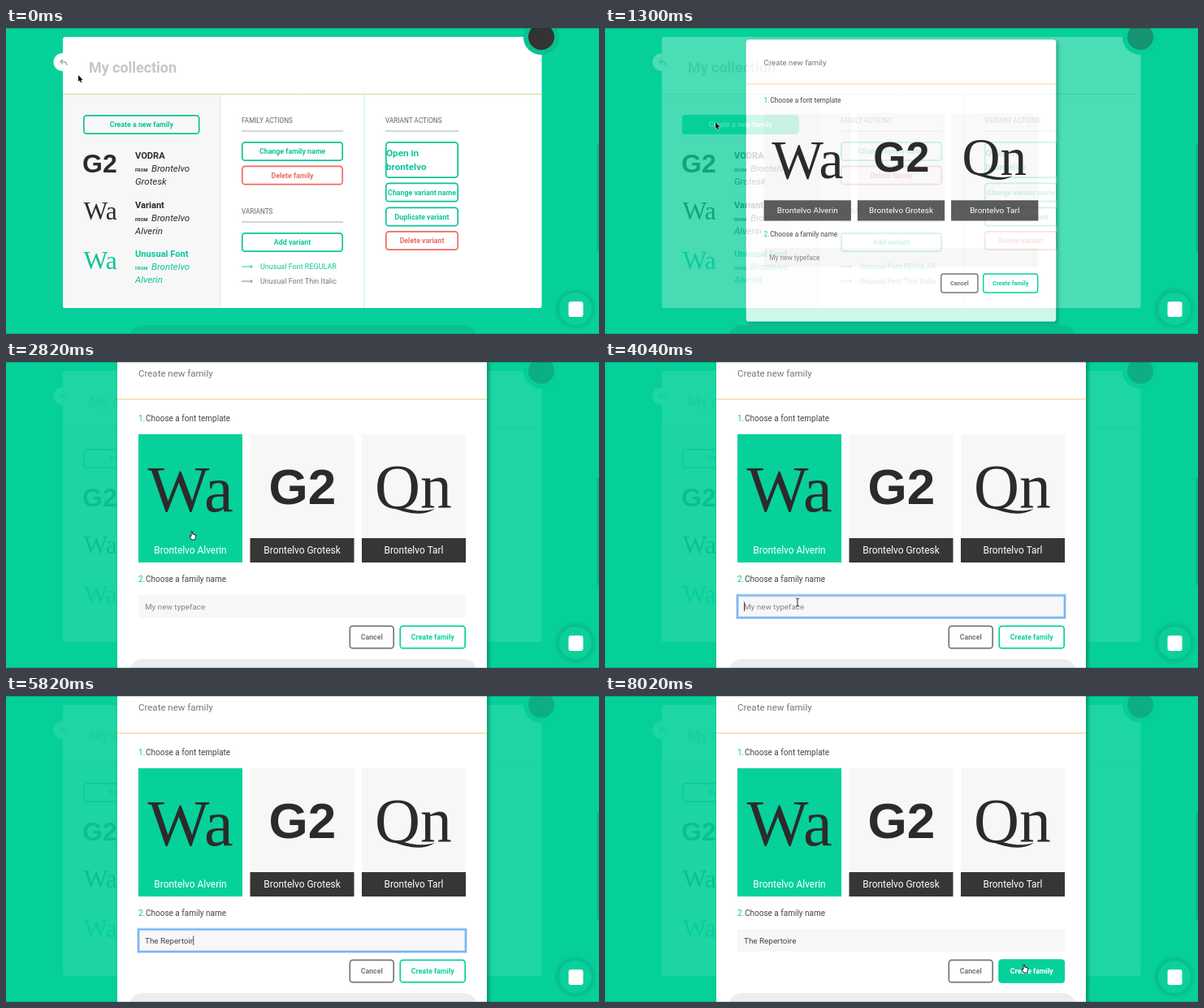
These frames come from a looping animation (730 by 377 pixels, 8.04 s). An HTML page with a canvas:

```html
<!DOCTYPE html>
<html lang="en">
<head>
<meta charset="utf-8">
<title>Create a font family</title>
<style>
html, body { margin: 0; width: 100%; height: 100%; overflow: hidden; background: #06d19b; }
canvas { display: block; width: 730px; height: 377px; }
</style>
</head>
<body>
<canvas id="stage"></canvas>
<script>
const W = 730, H = 377, LOOP = 8040;
const GREEN = '#06d19b', TEAL = '#0cc498', RED = '#ee6a5f', INK = '#2b2b2b', PALE = '#f7f7f7';
const TINT = 'rgba(0,0,0,.032)';
const SANS = 'Roboto, "Noto Sans", sans-serif';
const GROTESK = '"Liberation Sans", Arial, sans-serif';
const SERIF = '"Liberation Serif", Times, serif';
const BRAND = 'Brontelvo';
const TYPED = 'The Repertoire';

const MODAL_IN = 1150, MODAL_TIME = 328;
const PICK = 2600, FOCUS = 3760, BLUR = 7800;
const TYPE_START = 4200, KEY = 134, TYPE_END = TYPE_START + KEY * (TYPED.length - 1);
const PANEL = [137, -19, 455, 414, 4];

const canvas = document.getElementById('stage');
const ctx = canvas.getContext('2d');
const dpr = window.devicePixelRatio || 1;
canvas.width = W * dpr;
canvas.height = H * dpr;

const clamp = v => Math.max(0, Math.min(1, v));
const ramp = (t, start, time) => clamp((t - start) / time);
const hover = (t, on, off, time) => Math.min(ramp(t, on, time), 1 - ramp(t, off, time));

function fill(x, y, w, h, color, r = 0) {
  ctx.fillStyle = color;
  ctx.beginPath();
  ctx.roundRect(x, y, w, h, r);
  ctx.fill();
}

function disc(x, y, r, color) {
  ctx.fillStyle = color;
  ctx.beginPath();
  ctx.arc(x, y, r, 0, Math.PI * 2);
  ctx.fill();
}

function line(color, width, ...pts) {
  ctx.strokeStyle = color;
  ctx.lineWidth = width;
  ctx.beginPath();
  pts.forEach(([x, y]) => ctx.lineTo(x, y));
  ctx.stroke();
}

function text(str, x, y, size, color, style = '', align = 'left', family = SANS) {
  ctx.font = `${style} ${size}px ${family}`;
  ctx.textAlign = align;
  ctx.fillStyle = color;
  ctx.fillText(str, x, y);
}

function frame(x, y, w, h, color) {
  ctx.strokeStyle = color;
  ctx.lineWidth = 1.7;
  ctx.beginPath();
  ctx.roundRect(x + 0.8, y + 0.8, w - 1.6, h - 1.6, 3.5);
  ctx.stroke();
}

// Outlined button that fills with its colour as "on" goes to 1
function button(label, x, y, w, h, color, on = 0) {
  frame(x, y, w, h, color);
  if (on) {
    const base = ctx.globalAlpha;
    ctx.globalAlpha = base * on;
    fill(x, y, w, h, GREEN, 4);
    ctx.globalAlpha = base;
  }
  text(label, x + w / 2, y + h / 2 + 3.1, 8.8, on > 0.5 ? '#fff' : color, 'bold', 'center');
}

function family(y, name, kind, color) {
  text(name, 159, y, 11.1, color, 'bold');
  text('FROM', 159, y + 16, 5.6, color, 'bold');
  text(BRAND, 179, y + 16, 11.5, color, 'italic');
  text(kind, 159, y + 31.5, 11.5, color, 'italic');
}

function section(label, x, y, w) {
  text(label, x, y, 8.2, '#666');
  line('#aaa', 1, [x, y + 10.5], [x + w, y + 10.5]);
}

function variant(y, label, color) {
  line(color, 0.9, [290, y - 3], [303, y - 3]);
  line(color, 0.9, [301, y - 4.8], [303.3, y - 3], [301, y - 1.2]);
  text(label, 313, y, 9, color);
}

function drawPage(t) {
  fill(70, 11, 589.5, 334, '#fff', 3);
  fill(70, 82, 194, 263, PALE, [0, 0, 0, 3]);
  line('#cfdc9c', 1, [70, 81.5], [659, 81.5]);
  line('#e2e7e5', 1, [264, 82], [264, 345]);
  line('#bfeadc', 1, [441, 82], [441, 345]);

  disc(69.5, 42, 11, '#fff');
  line('#aaa', 1.5, [70, 38.5], [67, 41.5], [70, 44.5]);
  ctx.beginPath();
  ctx.moveTo(67, 41.5);
  ctx.quadraticCurveTo(74, 40.5, 75, 46);
  ctx.stroke();
  text('My collection', 102, 55, 17.9, '#c6c6c6', 'bold');

  button('Create a new family', 95, 107, 143.5, 24, TEAL, hover(t, 620, 1800, 150));
  text('G2', 94, 177.5, 32, INK, 'bold', 'left', GROTESK);
  text('Wa', 95.5, 236, 31.5, INK, '', 'left', SERIF);
  text('Wa', 95.5, 297, 31.5, TEAL, '', 'left', SERIF);
  family(161, 'VODRA', 'Grotesk', INK);
  family(222, 'Variant', 'Alverin', INK);
  family(282, 'Unusual Font', 'Alverin', TEAL);

  section('FAMILY ACTIONS', 290, 116.5, 125);
  button('Change family name', 290, 140, 125, 24, TEAL);
  button('Delete family', 290, 169.5, 125, 24, RED);
  section('VARIANTS', 290, 228.5, 125);
  button('Add variant', 290, 252, 125, 24, TEAL);
  variant(297, 'Unusual Font REGULAR', TEAL);
  variant(315, 'Unusual Font Thin Italic', '#777');

  section('VARIANT ACTIONS', 467, 116.5, 90);
  frame(467, 140, 90, 45, TEAL);
  text('Open in', 468, 158, 11.7, TEAL, 'bold');
  text(BRAND.toLowerCase(), 468, 175, 11.7, TEAL, 'bold');
  button('Change variant name', 467, 190.5, 90, 24, TEAL);
  button('Duplicate variant', 467, 220.5, 90, 24, TEAL);
  button('Delete variant', 467, 250, 90, 24, RED);
}

function card(x, picked, glow) {
  const base = ctx.globalAlpha;
  fill(x, 89, 128, 158, picked ? GREEN : TINT);
  if (picked) return;
  fill(x, 217, 128, 30, '#363636');
  ctx.globalAlpha = base * glow;
  fill(x, 89, 128, 158, '#20d6a5');
  fill(x, 217, 128, 30, '#11bd8f');
  ctx.globalAlpha = base;
}

function cardLabel(x, kind) {
  text(BRAND + ' ' + kind, x + 64, 236, 11.9, '#fff', '', 'center');
}

function drawField(t) {
  const focused = t >= FOCUS && t < BLUR;
  fill(163, 287, 403, 28, TINT);
  if (focused) {
    ctx.strokeStyle = 'rgba(110,175,250,.35)';
    ctx.lineWidth = 4;
    ctx.strokeRect(163, 287.5, 403, 27.5);
    ctx.strokeStyle = '#74b2f2';
    ctx.lineWidth = 1.8;
    ctx.strokeRect(163, 287.5, 403, 27.5);
  }
  const count = t < TYPE_START ? 0 : Math.min(TYPED.length, Math.floor((t - TYPE_START) / KEY) + 1);
  const str = TYPED.slice(0, count);
  text(str || 'My new typeface', 171, 304.7, 9.9, str ? '#444' : '#858585');

  const rest = t < TYPE_START ? t - FOCUS : Math.max(0, t - TYPE_END);
  if (focused && Math.floor(rest / 640) % 2 === 0) {
    const x = 171.5 + ctx.measureText(str).width;
    line('#333', 0.9, [x, 295.5], [x, 307]);
  }
}

function zoomModal(p) {
  const scale = 0.7 + 0.3 * p;
  ctx.translate(364.5, 188);
  ctx.scale(scale, scale);
  ctx.translate(-364.5, -188);
}

// Clips to everything but the panel
function clipAround() {
  ctx.beginPath();
  ctx.rect(-W, -H, 3 * W, 3 * H);
  ctx.roundRect(...PANEL);
  ctx.clip('evenodd');
}

function drawVeil(p, veil) {
  ctx.save();
  zoomModal(p);
  if (p) clipAround();
  ctx.globalAlpha = 0.9 * veil;
  fill(-W, -H, 3 * W, 3 * H, GREEN);
  ctx.restore();
}

function drawShadow() {
  ctx.save();
  clipAround();
  ctx.shadowColor = 'rgba(0,75,55,.5)';
  ctx.shadowBlur = 4 * dpr;
  ctx.shadowOffsetX = 2.5 * dpr;
  ctx.shadowOffsetY = 2 * dpr;
  const [x, y, w, h, r] = PANEL;
  fill(x, y, w, h, '#fff', r);
  ctx.restore();
}

function drawModal(t, p) {
  if (!p) return;
  const [x, y, w, h, r] = PANEL;
  ctx.save();
  zoomModal(p);

  ctx.globalAlpha = clamp(p * 1.75);
  drawShadow();
  fill(x, y, w, h, '#fff', r);
  card(163, t >= PICK, hover(t, 1990, 3400, 200));
  card(300.5, false, hover(t, 6710, 7160, 200));
  card(438, false, hover(t, 7165, 7195, 200));

  ctx.globalAlpha = clamp(p * 2.2);
  line('#f6dca6', 1.4, [137, 45.8], [592, 45.8]);
  text('Create new family', 163, 18, 11.5, '#777');
  text('1.', 163, 73, 10, TEAL);
  text('Choose a font template', 172, 73, 10, '#444');
  cardLabel(163, 'Alverin');
  cardLabel(300.5, 'Grotesk');
  cardLabel(438, 'Tarl');

  text('Wa', 174.5, 184, 80.5, INK, '', 'left', SERIF);
  text('G2', 323.5, 174.5, 62, INK, 'bold', 'left', GROTESK);
  text('On', 454, 179.5, 77.5, INK, '', 'left', SERIF);
  ctx.beginPath();
  ctx.moveTo(476, 178);
  ctx.bezierCurveTo(490, 177, 502, 188, 528, 181);
  ctx.bezierCurveTo(511, 191, 495, 186, 476, 180);
  ctx.fill();

  text('2.', 163, 270.5, 10, TEAL);
  text('Choose a family name', 172, 270.5, 10, '#444');
  drawField(t);
  button('Cancel', 422.5, 324.5, 55.5, 29, '#777');
  button('Create family', 484.5, 324.5, 81.5, 29, GREEN, ramp(t, 7460, 150));
  ctx.restore();
}

function drawBadge(veil) {
  disc(659, 11, 22, GREEN);
  ctx.globalAlpha = 1 - 0.8 * veil;
  disc(659, 11, 22, '#08c090');
  disc(659, 11, 16, '#333');
  ctx.globalAlpha = 1;
}

function drawFixed() {
  fill(152, 366, 428, 40, 'rgba(0,0,0,.07)', 16);
  disc(701, 346, 26, 'rgba(0,70,50,.05)');
  disc(701, 346, 23, 'rgba(0,70,50,.07)');
  disc(701, 346, 20, '#0bd09c');
  fill(692.5, 337, 18, 19, '#fff', 3);
  fill(727.5, 143, 2.5, 132, 'rgba(0,70,50,.18)', 1);
  fill(0, 0, W, 1, 'rgba(0,60,45,.25)');
  fill(0, H - 1, W, 1, 'rgba(0,60,45,.2)');
}

// time, x, y, and 1 where the pointer passes without slowing down
const PATH = [
  [0, 89, 58], [120, 89, 58], [800, 136, 116], [1750, 136, 116], [2350, 230, 213],
  [3150, 230, 213], [3650, 237, 296], [6450, 237, 296],
  [6850, 350, 215, 1], [7160, 449, 245, 1], [7500, 517, 335, 1], [LOOP, 517, 335]
];

function pointerAt(t) {
  const i = Math.max(1, PATH.findIndex(k => k[0] > t));
  const a = PATH[i - 1], b = PATH[i];
  let u = ramp(t, a[0], b[0] - a[0]);
  if (!b[3]) u = u * u * (3 - 2 * u);
  return [a[1] + (b[1] - a[1]) * u, a[2] + (b[2] - a[2]) * u];
}

function shape(pts) {
  ctx.beginPath();
  pts.forEach(([x, y]) => ctx.lineTo(x, y));
  ctx.closePath();
  ctx.lineWidth = 1;
}

function drawPointer(t) {
  if (t >= TYPE_START && t < 6450) return;
  const [x, y] = pointerAt(t);
  const inCards = t > 1990 && y > 89 && y < 247 && x > 163 && x < 566;
  const onCreate = (t > 620 && t < MODAL_IN) || (t > 7300 && y > 325);
  ctx.save();
  ctx.translate(x, y);
  ctx.lineJoin = 'round';
  if (inCards || onCreate) {
    shape([[-2, -4], [-0.5, -4], [-0.3, -1], [3.6, 0], [3.6, 2.6], [2.5, 6], [-1.5, 6], [-4, 2], [-3.5, 1], [-2, 2]]);
    ctx.fillStyle = '#fff';
    ctx.strokeStyle = '#222';
    ctx.fill();
    ctx.stroke();
  } else if (t > 2000 && y > 287 && y < 315) {
    line('#333', 1, [0, -4], [0, 4.5]);
    line('#333', 1, [-2, -5], [0, -4], [2, -5]);
    line('#333', 1, [-2, 5], [0, 4], [2, 5]);
  } else {
    shape([[0, 0], [0, 8], [1.8, 6.4], [3, 9.3], [4.4, 8.7], [3.2, 5.9], [5.6, 5.7]]);
    ctx.strokeStyle = '#fff';
    ctx.fillStyle = '#111';
    ctx.stroke();
    ctx.fill();
  }
  ctx.restore();
}

function draw(t) {
  ctx.setTransform(dpr, 0, 0, dpr, 0, 0);
  ctx.globalAlpha = 1;
  fill(0, 0, W, H, GREEN);
  drawPage(t);
  const p = ramp(t, MODAL_IN, MODAL_TIME);
  const veil = clamp(p * 1.75);
  drawVeil(p, veil);
  drawBadge(veil);
  drawModal(t, p);
  drawFixed();
  drawPointer(t);
}

const begin = performance.now();
function tick() {
  draw((performance.now() - begin) % LOOP);
  requestAnimationFrame(tick);
}
tick();
</script>
</body>
</html>
```
